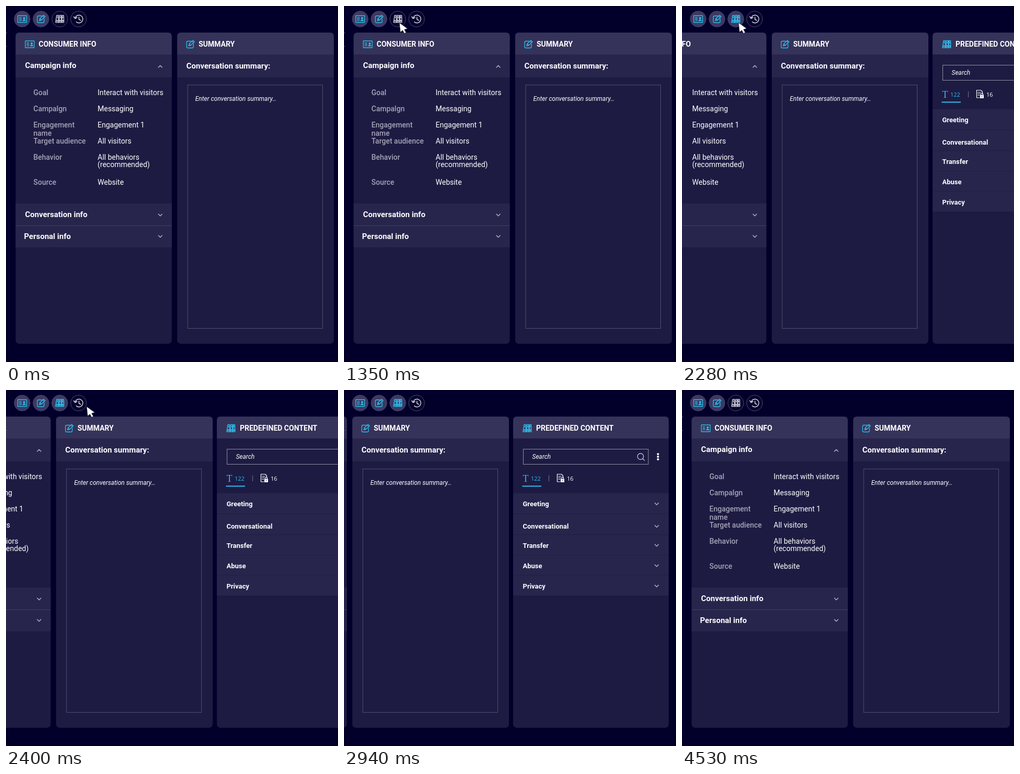
An HTML page for the animation above (4.65 s loop, 636x683 px).

```html
<!DOCTYPE html>
<html lang="en">
<head>
<meta charset="utf-8">
<title>Agent widgets</title>
<style>
  html, body { margin: 0; width: 100%; height: 100%; overflow: hidden; background: #02002b; }
  svg { display: block; width: 636px; height: 683px; font-family: Roboto, Arial, sans-serif; }
  text { fill: #fff; white-space: pre; }
  .title { font-size: 14px; font-weight: 600; }
  .section { font-size: 15px; font-weight: 600; }
  .row { font-size: 13px; font-weight: 600; }
  .value { font-size: 14px; }
  .label { font-size: 14px; font-weight: 500; fill: #a5a3b6; }
  .hint { font-size: 12px; font-style: italic; }
  .count { font: 11px "Open Sans", sans-serif; }
  .line { fill: none; stroke-linecap: round; stroke-linejoin: round; }
</style>
</head>
<body>
<svg viewBox="0 0 636 683" xmlns="http://www.w3.org/2000/svg">
  <defs>
    <g id="card" class="line" stroke="#2fbdeb" stroke-width="1.3">
      <rect x="-8.5" y="-6.5" width="17" height="13" rx=".5"/>
      <path d="M-5.5-2.8h4M-5.5 0h4M-5.5 2.8h4"/>
      <circle cx="3.7" cy="-1.6" r="1.4" fill="#2fbdeb"/>
      <path d="M1.2 3q2.5-3 5 0z" fill="#2fbdeb"/>
    </g>
    <g id="pencil" class="line" stroke="#2fbdeb" stroke-width="1.3">
      <path d="M1.5-6H-4.5Q-7-6-7-3.500V4.500Q-7 7-4.500 7H3.500Q6 7 6 4.500V-.5"/>
      <path d="M-3 3l1-4L5-7.500 8-4.700 1 2z M-2-1l3 3M3.500-6l3 3"/>
    </g>
    <g id="binders" class="line" stroke-width="1.4">
      <path d="M-5.500-7h3.500v13.500h-5.500z M0-7h3.500v13.500H-1z M5-7h3l.3 13.500h-4z"/>
      <path d="M-4-4.500v2.500M1.700-4.500v2.500M6.400-4.500v2.500"/>
      <circle cx="-4.600" cy="3.300" r="1.100"/><circle cx="1.300" cy="3.300" r="1.100"/><circle cx="6.300" cy="3.300" r="1.100"/>
    </g>
    <g id="history" class="line" stroke="#d5d4df" stroke-width="1.5">
      <path d="M-6.300-2.500A7.500 7.500 0 1 1-4.300 5.500M-9-4.500l2.300 3.500 3.700-2M.7-3.800V.5l3.300 2"/>
    </g>
  </defs>
  <path d="M0 51.500h2" stroke="#55536f"/>
  <g id="slider"><g id="strip"></g></g>
  <g id="home">
    <rect y="45" width="636" height="610" fill="#02002b"/>
    <path d="M0 51.500h2" stroke="#55536f"/>
    <use href="#strip"/>
  </g>
  <path d="M0 77.500h1.500" stroke="#77758c"/>
  <g id="toolbar"></g>
  <path id="cursor" d="M0 0L2 18.500 6.300 14.800 9.600 20.800 13 18.900 9.800 13.200 15.800 11.500z"
        fill="#fff" stroke="#15132f" stroke-width=".8" stroke-linejoin="round"/>
</svg>
<script>
const LOOP = 4650, STEP = 30, SHIFT = 312;
const BODY = '#1e1b43', HEAD = '#36335a', BAND = '#28254d', CYAN = '#2fbdeb';
const $ = id => document.getElementById(id);

const rect = (x, y, w, h, fill) => `<rect x="${x}" y="${y}" width="${w}" height="${h}" fill="${fill}"/>`;
const frame = (x, y, w, h, stroke) =>
  `<rect x="${x}" y="${y}" width="${w}" height="${h}" fill="none" stroke="${stroke}"/>`;
const text = (cls, x, y, str, extra = '') => `<text class="${cls}" x="${x}" y="${y}" ${extra}>${str}</text>`;
const icon = (id, x, y, extra = '') => `<use href="#${id}" x="${x}" y="${y}" ${extra}/>`;
const path = (d, stroke, width) => `<path class="line" d="${d}" stroke="${stroke}" stroke-width="${width}"/>`;
const chevron = (x, y, dir = 1) => path(`M${x - 3.5} ${y - 1.8 * dir}l3.500 ${3.6 * dir} 3.500 ${-3.6 * dir}`, '#b5b3c4', 1.4);

function panel(x, w, iconId, iconX, title, titleX, content) {
  return `<rect x="${x}" y="51" width="${w}" height="597" rx="7" fill="${BODY}"/>
    <path d="M${x} 93V58q0-7 7-7h${w - 14}q7 0 7 7v35z" fill="${HEAD}"/>
    ${icon(iconId, iconX, 73.5, `stroke="${CYAN}"`)}${text('title', titleX, 78, title)}${content}`;
}

function consumerPanel() {
  const facts = [
    [171, 'Goal', 'Interact with visitors'], [202, 'Campalgn', 'Messaging'],
    [233, 'Engagement', 'Engagement 1'], [248.5, 'name', ''],
    [264, 'Target audience', 'All visitors'], [295, 'Behavior', 'All behaviors'],
    [309, '', '(recommended)'], [343, 'Source', 'Website']
  ];
  return panel(18.5, 299, 'card', 45.5, 'CONSUMER INFO', 62.5,
    rect(18.5, 93, 299, 44, BAND) + text('section', 36.5, 118.500, 'Campaign info') + chevron(295.5, 116, -1) +
    facts.map(([y, label, value]) => text('label', 52.5, y, label) + text('value', 175.5, y, value)).join('') +
    rect(18.5, 379, 299, 84, BAND) + rect(18.5, 421, 299, 1, '#403d63') +
    text('section', 36.5, 404.500, 'Conversation info') + chevron(295.5, 401) +
    text('section', 34.500, 446.500, 'Personal info') + chevron(295.5, 442));
}

function summaryPanel() {
  return panel(328, 300, 'pencil', 353, 'SUMMARY', 369,
    rect(328, 93, 300, 44, BAND) + text('section', 345.500, 119.500, 'Conversation summary:') +
    frame(348, 151.5, 258.5, 467, '#504e6e') + text('hint', 362.5, 181.500, 'Enter conversation summary…'));
}

function contentPanel() {
  const rows = [[198, 40, 'Greeting', 218.5], [238, 40, 'Conversational', 261.5],
    [278, 39, 'Transfer', 298], [317, 39, 'Abuse', 337], [356, 39, 'Privacy', 376]];
  const search = frame(655.5, 113.5, 239.500, 29, '#918fa4') + text('hint', 672.5, 132, 'Search') +
    `<circle cx="880" cy="127.500" r="5.800" fill="none" stroke="#d8d7e0" stroke-width="1.200"/>` +
    path('M884.300 131.800l3.200 3.200', '#d8d7e0', 1.2) +
    [123, 128, 133].map(y => `<circle cx="913.500" cy="${y}" r="2.100" fill="#fff"/>`).join('');
  const tabs = text('', 654.500, 176, 'T', `style="font:18px 'Liberation Serif',serif;fill:${CYAN}"`) +
    text('count', 670, 174, '122', `style="fill:${CYAN}"`) + rect(653.5, 183.5, 36.500, 2, CYAN) +
    rect(704, 164, 1, 11, '#777590') +
    path('M726 176h-5.500v-14.500h8l3 3v4M722.800 165.500h5M722.800 168.500h4M722.800 171.500h3', '#fff', 1.2) +
    rect(727, 170.500, 7, 6.500, '#fff') + path('M728.500 170v-1.500q2-2.500 4 0v1.500', '#fff', 1.2) +
    rect(730, 172.500, 1, 2, BODY) + text('count', 739, 174, '16');
  const list = rows.map(([y, h, name, mid]) =>
    rect(636, y, 298, h, BAND) + rect(636, y + h - 1, 298, 1, '#211e46') +
    text('row', 654.500, mid + 4.500, name) + chevron(911, mid)).join('');
  return panel(636, 298, 'binders', 662.5, 'PREDEFINED CONTENT', 680, search + tabs + list);
}

const disc = (x, on) => `<circle cx="${x}" cy="25" r="15.200" fill="${on ? '#3b3a63' : '#06042d'}" stroke="${on ? '#44436b' : '#4b4969'}"/>`;

$('strip').innerHTML = consumerPanel() + summaryPanel() + contentPanel();
$('toolbar').innerHTML = disc(31, true) + icon('card', 31, 25) + disc(67, true) + icon('pencil', 67, 25) +
  disc(103, false) + icon('binders', 102.5, 25, 'stroke="#c9c8d4"') +
  `<g id="active">${disc(103, true)}${icon('binders', 102.5, 25, `stroke="${CYAN}"`)}</g>` +
  disc(139, false) + icon('history', 139, 25);

const clamp = v => Math.min(1, Math.max(0, v));
const ramp = (t, from, to) => clamp((t - from) / (to - from));
const smooth = u => u * u * (3 - 2 * u);

// time, x, y, velocity x, velocity y
const cursorKeys = [
  [810, 602, 347, 0, 0], [1350, 106, 32, 0, 0], [2250, 106, 32, 0, 0],
  [2550, 274, 50, .95, .25], [2880, 596, 216, 1, .85], [2940, 658, 268, 1, .9]
];

function cursorAt(t) {
  const i = cursorKeys.findIndex(key => t < key[0]);
  const a = cursorKeys[i - 1], b = cursorKeys[i];
  const span = b[0] - a[0], u = (t - a[0]) / span;
  return [1, 2].map(k => a[k] + (b[k] - a[k]) * smooth(u) +
    span * u * (1 - u) * (a[k + 2] * (1 - u) - b[k + 2] * u));
}

function render(time) {
  const t = Math.floor(time % LOOP / STEP) * STEP;
  const fade = ramp(t, 4200, 4530);
  const slide = SHIFT * smooth(ramp(t, 1925, 2635));
  $('slider').setAttribute('transform', `translate(${-slide.toFixed(2)} 0)`);
  $('home').setAttribute('opacity', fade);
  $('home').setAttribute('visibility', fade ? 'visible' : 'hidden');
  $('active').setAttribute('opacity', ramp(t, 1800, 1920) * (1 - fade));
  const shown = t >= 810 && t < 2940;
  $('cursor').setAttribute('visibility', shown ? 'visible' : 'hidden');
  if (shown) $('cursor').setAttribute('transform', `translate(${cursorAt(t)})`);
}

const start = performance.now();
function tick() {
  render(performance.now() - start);
  requestAnimationFrame(tick);
}
tick();
</script>
</body>
</html>
```
